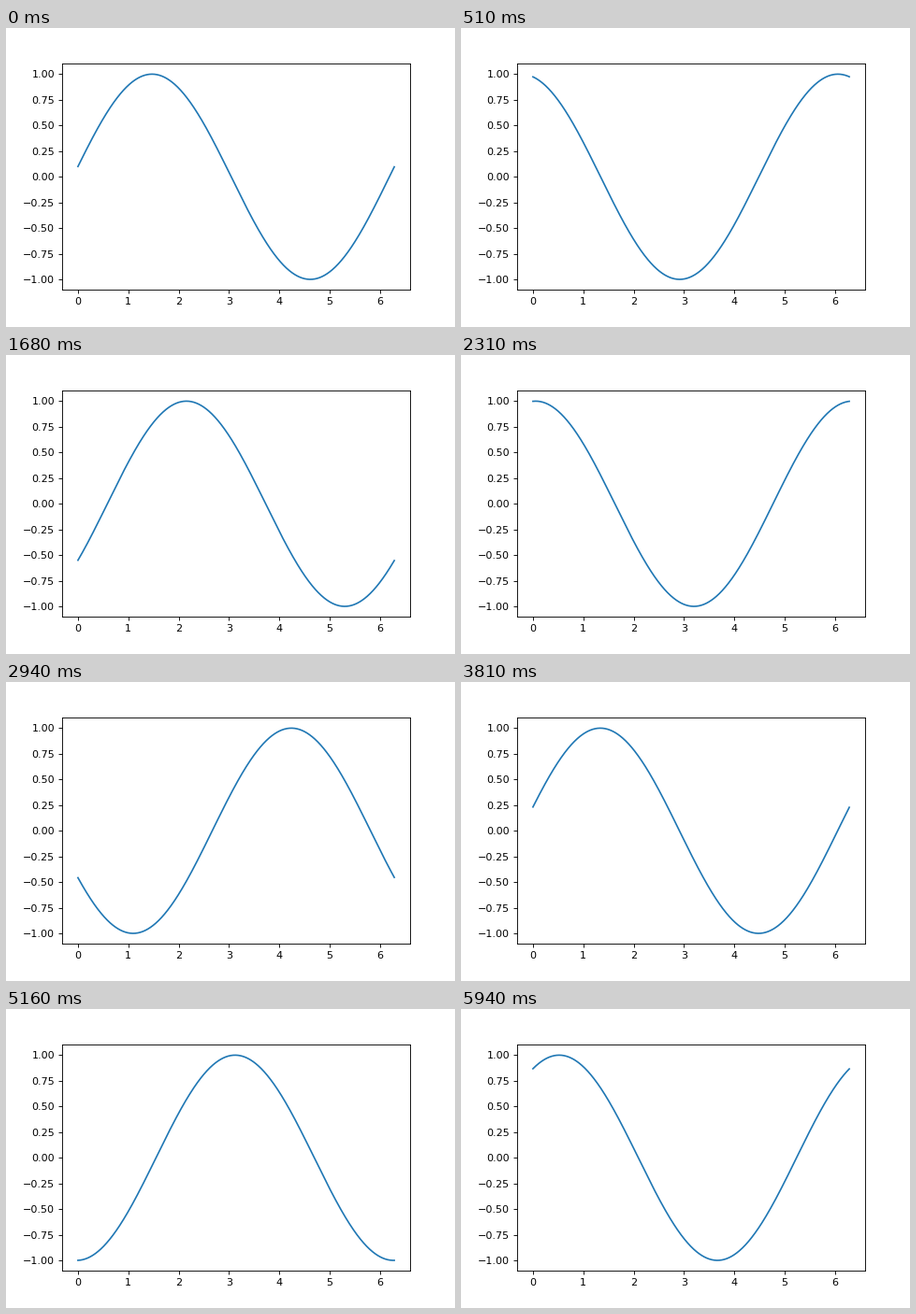
Animation, 480 px wide and 320 px high, one loop 5970 ms. Source, as a matplotlib script:

```python
import matplotlib.pyplot as plt
import numpy as np
from matplotlib.animation import FuncAnimation

FRAMES = 199
INTERVAL = 30  # ms
STEP = 0.1     # phase advance per frame

plt.rcParams["font.family"] = "DejaVu Sans"

fig, ax = plt.subplots(figsize=(6, 4), dpi=80)
fig.subplots_adjust(left=0.125, right=0.9, bottom=0.125, top=0.88)

x = np.arange(0, 2 * np.pi, 0.01)
line, = ax.plot(x, np.sin(x))


def update(i):
    line.set_ydata(np.sin(x + (i + 1) * STEP))
    return line,


anim = FuncAnimation(fig, update, frames=FRAMES, init_func=lambda: update(0),
                     interval=INTERVAL, repeat=True, repeat_delay=0)

plt.show()
```
